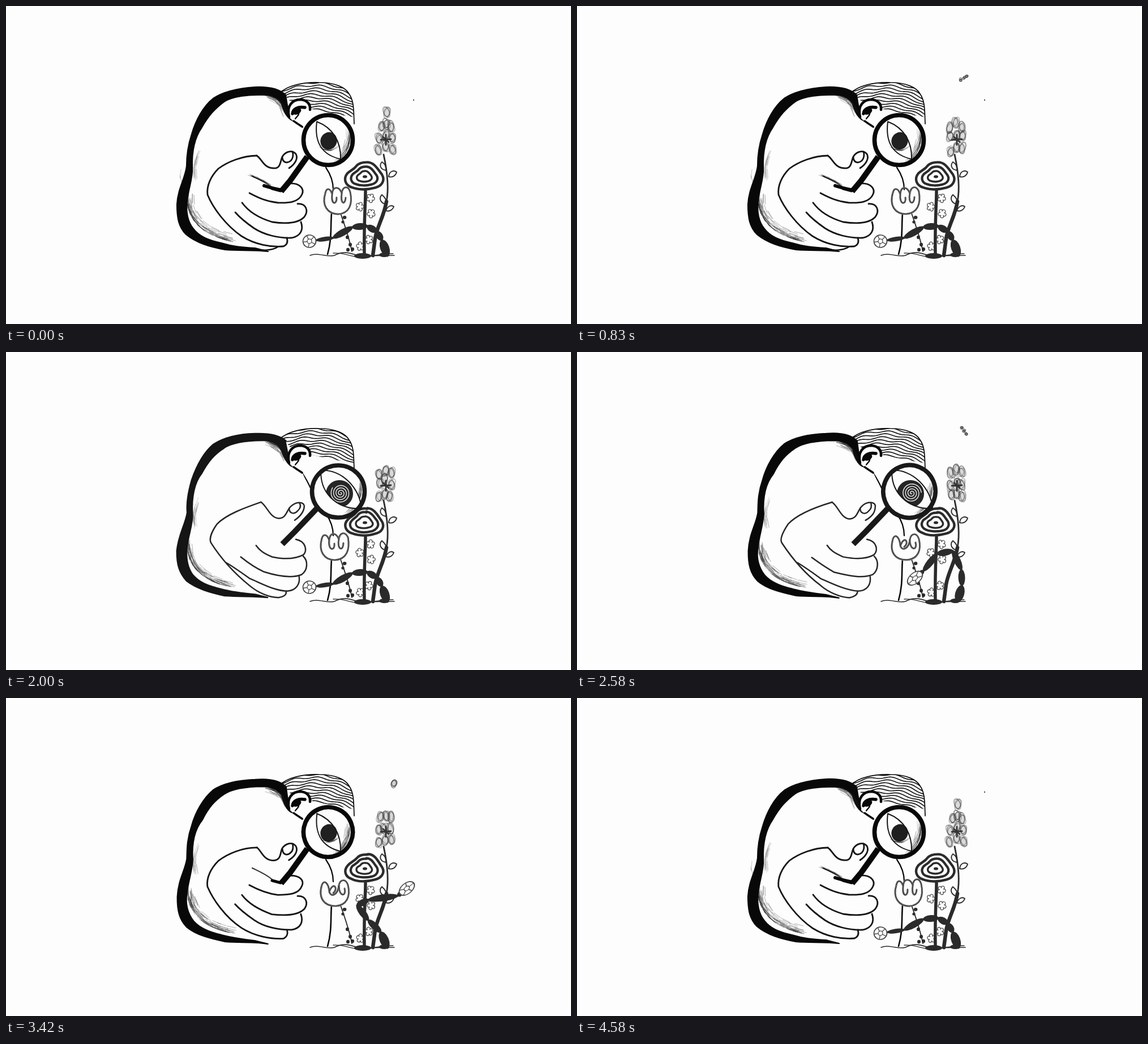
An HTML page with a canvas for the animation above (4730 ms loop, 998x561 px).

```html
<!DOCTYPE html>
<html lang="en">
<head>
<meta charset="utf-8">
<title>Looking closely</title>
<style>
html, body { margin: 0; height: 100%; overflow: hidden; background: #fdfdfd; }
canvas { display: block; width: 100vw; height: 100vh; }
</style>
</head>
<body>
<canvas id="stage" width="998" height="561"></canvas>
<script>
const g = document.getElementById('stage').getContext('2d');
const PAPER = '#fdfdfd', INK = '#080808', SOFT = '#2b2b2b', PENCIL = '#555';
const LOOP = 4730, STEP = 1000 / 12, LAST = 55;
const NUM = /-?\d+(\.\d+)?/g;

function random(seed) {
  let s = seed * 7919 + 17;
  return () => (s = (s * 16807) % 2147483647) / 2147483647;
}
const lerp = (a, b, u) => a + (b - a) * u;
const clamp = u => Math.max(0, Math.min(1, u));
const smooth = u => u * u * (3 - 2 * u);

// Blend two paths of the same structure.
function mix(a, b, u) {
  const to = b.match(NUM);
  let i = 0;
  return a.replace(NUM, v => lerp(+v, +to[i++], u));
}
// Redraw a path by a slightly unsteady hand; seed 0 is steady.
function wobble(d, seed, amp = 0.8) {
  if (!seed) return d;
  const r = random(seed);
  r();
  return d.replace(NUM, v => +v + (r() - 0.5) * 2 * amp);
}
function line(d, width = 2.4, color = INK) {
  g.lineWidth = width;
  g.strokeStyle = color;
  g.stroke(new Path2D(d));
}
function fill(d, color = INK) {
  g.fillStyle = color;
  g.fill(new Path2D(d));
}
function oval(x, y, rx, ry, turn = 0, color = SOFT, width = 0) {
  g.beginPath();
  g.ellipse(x, y, rx, ry, turn, 0, 7);
  if (width) {
    g.lineWidth = width;
    g.strokeStyle = color;
    g.stroke();
  } else {
    g.fillStyle = color;
    g.fill();
  }
}
// Dry-brush strokes scattered along a quadratic curve.
function brush([x0, y0, x1, y1, x2, y2], count, spread, seed, alpha = 0.3) {
  const r = random(seed + 3);
  g.lineWidth = 1;
  g.strokeStyle = `rgba(20,20,20,${alpha})`;
  for (let i = 0; i < count; i++) {
    const t = r(), k = 1 - t;
    const x = k * k * x0 + 2 * k * t * x1 + t * t * x2;
    const y = k * k * y0 + 2 * k * t * y1 + t * t * y2;
    const dx = k * (x1 - x0) + t * (x2 - x1), dy = k * (y1 - y0) + t * (y2 - y1);
    const len = 8 / Math.hypot(dx, dy), off = r() * r() * spread;
    const px = x + dy * len / 8 * off, py = y - dx * len / 8 * off;
    g.beginPath();
    g.moveTo(px - dx * len, py - dy * len);
    g.lineTo(px + dx * len, py + dy * len);
    g.stroke();
  }
}

const BODY = 'M494 157 C484 147 466 142 440 143 C412 145 385 150 366 163 C348 177 335 202 328 226 ' +
  'C320 250 319 268 319 283 C316 306 304 320 302 350 C302 374 305 390 318 403 C336 418 360 425 387 430 ' +
  'C415 432 440 430 463 433 L440 427 C415 426 400 424 380 418 C356 413 341 406 331 393 ' +
  'C320 379 318 361 320 345 C322 321 330 306 329 285 C328 256 334 231 346 214 C358 193 369 181 385 169 ' +
  'C400 159 430 156 454 157 C470 157 480 161 487 172 C490 186 497 197 504 201 L501 191 C497 180 496 170 494 157 Z';
const BACK = 'M484 153 C510 165 515 200 523 212 L540 250 L440 425 L370 418 L325 385 L318 345 L328 285 L345 214 L390 160 Z';
const HAIR = 'M482 154 C497 140 526 134 553 135 C582 135 600 144 606 155 C615 168 614 184 615 196 ' +
  'C592 193 560 186 538 181 C537 170 524 163 504 169 L494 172 Z';

const HAND = [
  ['M443 264 C418 264 391 275 375 287 C362 300 354 317 356 333 C365 355 387 386 416 406 C440 421 468 426 490 424 C497 421 498 415 496 409',
   'M450 265 C425 273 390 285 373 303 C363 318 358 330 362 337 C380 365 405 392 430 412 C445 425 465 433 481 433 C490 432 495 428 495 423'],
  ['M443 264 C452 270 455 285 471 286 C486 288 484 274 488 266 C493 257 505 253 512 261 C516 268 512 278 500 286',
   'M450 265 C462 272 466 292 481 294 C497 294 495 278 505 271 C512 264 525 264 527 271 C527 282 522 289 510 297'],
  ['M488 267 C489 277 497 278 503 273 C507 269 508 262 506 257',
   'M500 276 C500 285 509 287 515 281 C520 276 521 271 519 266'],
  ['M500 313 C520 312 527 323 523 332 C517 346 500 348 480 347 C460 345 445 338 430 330',
   'M512 330 C530 334 532 350 525 358 C510 366 490 366 470 361 C455 355 448 350 442 341'],
  ['M515 349 C530 348 535 361 527 372 C515 385 490 384 470 381 C450 375 430 365 417 347',
   'M525 360 C534 368 533 385 522 393 C505 400 480 395 455 388 C435 378 425 370 415 362'],
  ['M521 381 C526 395 520 406 505 409 C480 410 455 403 438 392 C425 383 412 372 405 364',
   'M518 396 C520 410 512 421 497 422 C475 421 450 408 430 400 C410 385 400 378 390 372']
];
const EYE = [
  'M549 204 C545 235 554 262 591 270 C592 240 578 215 549 204 Z',
  'M556 209 C554 245 580 277 628 276 C626 240 592 206 556 209 Z'
];
const RING = 'M5 -27 C19 -27 25 -14 33 -4 C40 8 32 18 20 21 C6 25 -12 25 -24 20 C-36 16 -40 4 -32 -6 C-26 -12 -20 -13 -15 -20 C-10 -26 -3 -27 5 -27 Z';

const CUP = {
  a: ['M564 330 C557 352 568 367 587 367 C606 366 613 350 608 328 C604 316 595 318 593 330',
      'M593 330 C590 350 599 352 600 338 M593 330 C588 317 577 318 576 332 C574 352 585 351 584 338 M576 332 C572 320 566 321 564 330'],
  b: ['M558 329 C551 353 563 367 581 367 C601 366 608 350 604 327 C599 316 590 318 588 330',
      'M588 330 C584 350 596 352 596 337 M588 330 C582 317 572 318 571 332 C569 352 582 351 580 338 M571 332 C567 320 560 321 558 329'],
  c: ['M558 330 C551 354 563 367 582 367 C602 366 609 350 604 330 C600 318 590 319 588 331',
      'M588 331 C586 348 574 352 571 342 C570 327 562 319 558 330 M571 342 C578 322 588 336 578 344 M588 331 C588 352 602 350 598 336'],
  d: ['M555 344 C547 360 555 375 575 376 C601 378 613 364 608 348 C606 333 594 329 590 338 C586 329 573 330 571 341 C564 332 556 335 555 344 Z',
      'M571 341 C572 351 581 347 577 340 M590 338 C591 348 600 347 599 339']
};
const CUP_ORDER = 'aabbddbbccb';

const REST = [674,441, 664,413, 655,398, 638,388, 612,390, 578,409, 536,415];
const RISE = [672,441, 680,412, 679,384, 664,351, 636,356, 612,386, 597,399];
const REACH = [674,441, 664,413, 652,398, 640,380, 664,364, 705,366, 742,368];
const TURN = [674,441, 662,413, 640,392, 620,366, 640,356, 692,349, 708,336];
const CRAWL = [[0, REST], [27, REST], [31, RISE], [39, REACH], [41, TURN], [44, RISE], [47, REST], [60, REST]];

function head(seed, u) {
  fill(HAIR, PAPER);
  g.save();
  g.clip(new Path2D(HAIR));
  for (let i = 0; i < 12; i++) {
    let d = '';
    for (let x = 480; x <= 618; x += 3) {
      const y = 135 + i * 5.3 + 0.0034 * (x - 540) ** 2 + 1.6 * Math.sin(x / 6.5 + i * 0.9 + seed * 0.7);
      d += (d ? 'L' : 'M') + x + ' ' + y;
    }
    line(d, 1.7, '#181818');
  }
  g.restore();
  line('M483 154 C497 140 526 134 553 135 C582 135 600 144 606 155 C615 168 614 184 615 208', 1.7);
  line(mix('M510 202 C515 205 519 209 524 214', 'M512 201 C522 209 530 223 538 240', u), 2.2);
  line('M565 285 C574 298 578 310 578 324', 2.2);
}

function ear() {
  const d = 'M500 196 C495 176 506 165 520 165 C532 166 538 173 537 183';
  fill(d + ' L524 196 L506 202 Z', PAPER);
  line(d, 4.6);
  line('M506 190 C507 181 516 177 528 179', 5.5);
  oval(514, 186, 8, 5, -0.5, INK);
  line('M517 187 C519 193 512 196 511 199', 2.2);
}

function body(seed) {
  const d = wobble(BODY, seed, 1.1), ink = seed === 4 ? '#151515' : INK;
  fill(BACK, PAPER);
  fill(d, ink);
  line(d, 2.2, ink);
  line('M500 196 C508 204 516 208 523 213', 3.5);
  brush([320, 338, 320, 398, 397, 415], 120, 15, seed, 0.34);
  brush([496, 186, 488, 164, 466, 158], 80, 10, seed + 2, 0.3);
  brush([332, 305, 328, 285, 337, 262], 22, -7, seed + 1, 0.18);
  if (!seed) brush([308, 292, 306, 300, 309, 308], 5, 3, 1, 0.12);
}

function hand(seed, u, n) {
  const color = u > 0.5 ? '#262626' : '#151515', width = u > 0.5 ? 2.5 : 2.8;
  HAND.forEach(([a, b], i) => line(wobble(mix(a, b, u), seed && seed + i * 6, 0.6), width, color));
  if (u < 0.5) {
    line('M435 300 C445 305 458 310 470 320', 2.2, '#333');
    if (n < 15) line('M432 427 C450 432 470 432 480 425', 2.2);
    if (!seed) {
      line('M456 317 C468 321 478 323 488 325', 6);
      brush([434, 301, 450, 307, 468, 319], 20, 4, 5, 0.35);
    }
  }
}

function glass(seed, u, n) {
  const x = lerp(569, 587, u), y = lerp(236.5, 246, u), r = lerp(43.5, 46, u);
  const ink = u > 0.5 ? '#191919' : INK;
  g.lineCap = 'butt';
  line(mix('M532 266 L502 308 L486 327', 'M549 276 L510 317 L488 339', u), 10, ink);
  g.lineCap = 'round';
  if (u < 0.5) line('M470 322 L485 326', 5);
  oval(x, y, r, r + 0.5, 0, PAPER);
  brush([x + r - 5, y - 12, x + r - 3, y + 20, x + 18, y + r - 8], 70, -10, seed, 0.2);
  const eye = mix(EYE[0], EYE[1], u);
  fill(eye, PAPER);
  const px = lerp(570, 591, u), py = lerp(238, 249, u);
  if (u > 0.5) {
    g.save();
    g.clip(new Path2D(eye));
    oval(px - 2, py + 1, 24, 24, 0, '#262626');
    g.restore();
    let d = '';
    for (let a = 0; a < 24; a += 0.2) {
      const q = a + n * 1.25, k = 0.8 + a * 0.68;
      d += (d ? 'L' : 'M') + (px + Math.cos(q) * k) + ' ' + (py + Math.sin(q) * k);
    }
    line(d, 1.6, '#ddd');
  } else {
    oval(px, py, 14.5, 15.5, 0.4, '#202020');
    brush([px - 12, py + 13, px, py + 20, px + 12, py + 13], 14, 4, seed, 0.3);
  }
  line(wobble(eye, seed, 0.5), 2, '#161616');
  oval(x, y, r, r + 0.5, seed * 0.4, ink, 7.6);
}

function blossom(x, y, n) {
  for (let i = 0; i < 5; i++) {
    const a = i * 1.257 + n * 0.2;
    g.beginPath();
    g.arc(x + Math.cos(a) * 4.2, y + Math.sin(a) * 4.8, 3, a - 2, a + 2);
    g.lineWidth = 1.3;
    g.strokeStyle = PENCIL;
    g.stroke();
  }
}

function ringFlower(seed) {
  line('M635 326 C635 350 632 380 633 440', 5.5, SOFT);
  g.save();
  g.translate(633, 301);
  fill(RING, PAPER);
  [[0.94, 4.4], [0.65, 4.2], [0.37, 3.4]].forEach(([size, width], i) => {
    const s = size + (i ? seed * 0.012 : 0);
    g.save();
    g.scale(s, s);
    line(wobble(RING, seed && seed + i, 1), width / s, SOFT);
    g.restore();
  });
  oval(1, 0, 4, 2.6, 0);
  g.restore();
}

function tulip(p) {
  const kind = CUP_ORDER[p], [outer, inner] = CUP[kind];
  line('M575 366 C573 390 576 410 568 438', 2.6, INK);
  line(kind === 'd' ? 'M582 377 C594 392 605 412 612 433' : 'M591 366 C598 386 606 408 611 433', 1.8, SOFT);
  fill(outer, PAPER);
  for (const d of [outer, inner]) {
    line(d, 3.2, '#777');
    line(wobble(d, p + 1, 0.7), 1.7, '#444');
  }
  if (kind === 'd') {
    line('M585 374 L600 373 L587 378 L598 379 L590 383', 2, SOFT);
  } else {
    oval(598, 373, 3.4, 3);
    oval(595, 381, 2.6, 2.6);
  }
  [[603, 408], [608, 421], [604, 430], [612, 429]].forEach(([x, y]) => oval(x, y, 3, 3.2));
}

function petal(x, y, rx, ry, seed, alpha = 0.4) {
  const r = random(seed + 1);
  r();
  const color = `rgba(55,55,55,${alpha})`;
  oval(x, y, rx * 0.8, ry * 0.8, 0, `rgba(80,80,80,${alpha * 0.5})`);
  for (let i = 0; i < 4; i++)
    oval(x + r() * 3 - 1.5, y + r() * 3 - 1.5, rx, ry * (0.75 + r() * 0.3), r() - 0.5, color, 1.4);
}

function spire(p, n) {
  line('M667 262 C673 290 677 320 672 345 C670 362 666 376 660 385', 2.8, SOFT);
  line('M672 345 C668 370 655 390 652 410 L648 440', 6.5, SOFT);
  ['M676 301 C677 291 685 289 690 293 C688 300 682 303 676 301',
   'M671 290 C661 288 659 281 664 275 C670 279 672 284 671 290',
   'M671 350 C661 347 658 339 664 333 C670 338 673 344 671 350',
   'M671 361 C674 353 681 350 685 354 C682 361 676 363 671 361'].forEach(d => line(d, 1.9, SOFT));

  const r = random(p + 9);
  r();
  const rows = p ? 3 : 4;
  for (let row = 0; row < rows; row++) {
    const wide = p ? 10 : [13, 12, 8, 2][row];
    for (let side = -1; side <= 1; side++) {
      if (row === 3 && side) continue;
      const x = 670 + side * wide + (p ? r() * 5 - 2.5 : row);
      const y = 253 - row * 20 + (side ? 0 : -5) + (p ? r() * 8 - 4 : 0);
      petal(x, y, 5, 10, p * 13 + row * 3 + side);
    }
  }
  line('M662 236 L680 235 M671 227 L671 245 M666 231 L676 240', 2.8, '#333');

  // A petal breaks loose, then falls apart on its way up.
  if (p >= 6) {
    const y = 175 - (p - 6) * 12, a = 0.9 - (p - 9) * 1.4;
    if (p < 9) petal(686, y, 4.5, 7, p, 0.5);
    else {
      for (const k of [-6, 0, 6])
        petal(684 + Math.cos(a) * k, y + Math.sin(a) * k, 2, 2, p + k + 6, 0.5);
    }
  }
  if (p >= 4 && p <= 6) {
    const x = 677 + (p - 5) * 6, y = 130 + (5 - p) * 12;
    petal(x, y - 4, 1.4, 1.6, p);
    petal(x, y + 4, 1.4, 1.8, p + 1);
  }
  if (n % 5 === 0) oval(720, 166, 0.9, 1.4, 0, '#333');
}

function creeper(n) {
  const i = CRAWL.findIndex(([t], k) => t <= n && n < CRAWL[k + 1][0]);
  const [t0, a] = CRAWL[i], [t1, b] = CRAWL[i + 1];
  const v = a.map((x, k) => lerp(x, b[k], (n - t0) / (t1 - t0)));
  for (let k = 0; k < 12; k += 2) {
    let [x0, y0, x1, y1] = v.slice(k, k + 4);
    const len = Math.hypot(x1 - x0, y1 - y0), turn = Math.atan2(y1 - y0, x1 - x0);
    if (k === 10) {
      x1 -= Math.cos(turn) * 12;
      y1 -= Math.sin(turn) * 12;
    }
    const half = Math.hypot(x1 - x0, y1 - y0) / 2;
    oval((x0 + x1) / 2, (y0 + y1) / 2, half + 0.5, k === 0 ? 8 : k === 10 ? 4 : 6, turn);
    line(`M${x0} ${y0}L${x1} ${y1}`, 3, SOFT);
    if (k === 10) bud(v[12], v[13], turn, len < 25);
  }
}
function bud(x, y, turn, narrow) {
  g.save();
  g.translate(x, y);
  g.rotate(turn);
  if (narrow) g.scale(1.35, 0.85);
  oval(0, 0, 11.5, 11, 0, PAPER);
  oval(0, 0, 11.5, 11, 0, '#444', 1.7);
  oval(0, 0, 4, 4, 0, PENCIL, 1.3);
  for (let a = 0; a < 6; a += 1.257) {
    const c = Math.cos(a), s = Math.sin(a);
    line(`M${c * 4} ${s * 4}L${c * 11} ${s * 11}`, 1.4, PENCIL);
  }
  g.restore();
}

function ground() {
  line('M537 440 C552 434 566 444 580 440 C598 430 612 438 625 441 L686 440', 1.6, SOFT);
  line('M578 436 C598 434 608 444 632 443 C650 440 664 437 684 437', 1.3, SOFT);
  oval(630, 441, 15, 5, 0);
  oval(668, 439, 9, 4, 0);
}

function draw(n) {
  const seed = n % 5, p = n % 11;
  const u = smooth(clamp((n - 12) / 3) - clamp((n - 34) / 3));
  g.fillStyle = PAPER;
  g.fillRect(0, 0, 998, 561);
  g.lineCap = g.lineJoin = 'round';
  head(seed, u);
  ground();
  tulip(p);
  [[625, 354], [644, 339], [645, 366], [641, 412], [626, 424]].forEach(([x, y], i) => blossom(x, y, seed + i));
  spire(p, n);
  ringFlower(seed);
  creeper(n);
  body(seed);
  ear();
  hand(seed, u, n);
  glass(seed, u, n);
}

function tick() {
  const t = performance.now() % LOOP;
  draw(Math.min(LAST, Math.floor((t + 4) / STEP)));
  requestAnimationFrame(tick);
}
tick();
</script>
</body>
</html>
```
